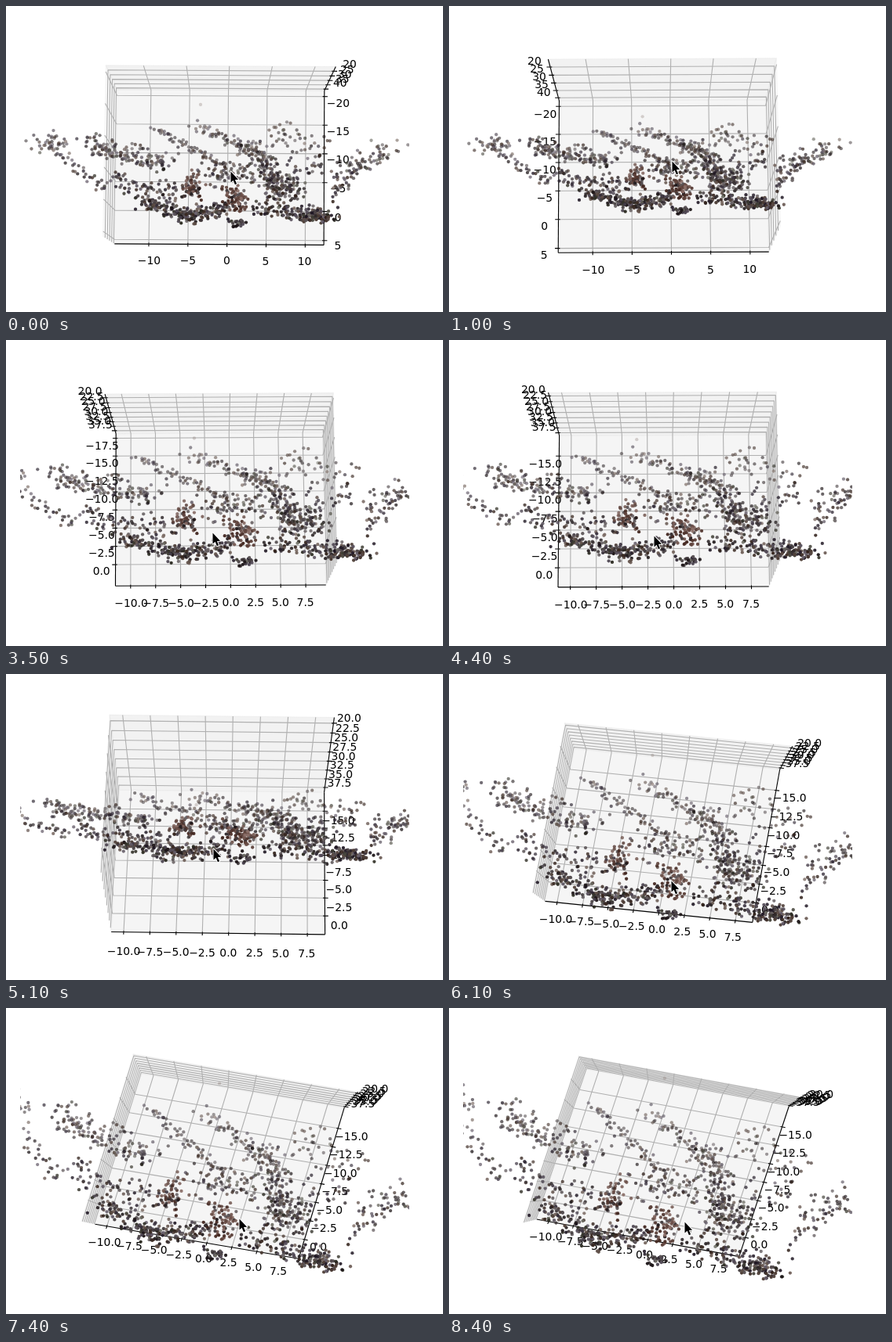
Write an HTML page with a canvas that moves like this. It is 557 px wide and 391 px high and loops after 8500 ms.

```html
<!DOCTYPE html>
<html lang="en">
<head>
<meta charset="utf-8">
<title>Rotating point cloud</title>
<style>
  html, body { margin: 0; width: 100%; height: 100%; overflow: hidden; background: #fff; }
  canvas { display: block; width: 557px; height: 391px; }
</style>
</head>
<body>
<canvas id="stage" width="557" height="391"></canvas>
<script>
const ctx = document.getElementById('stage').getContext('2d');
const LOOP = 8500, STEP = 100, PAUSE = 100;
const CX = 272.7, CY = 196, SX = 2681, SY = 1998, DIST = 10;
const HALF = 0.5 + 1 / 48, LABEL = HALF + 0.0738;
const SPAN = 25.7, CENTER = [-1, -7.62, 28.75];
const RAD = Math.PI / 180;

// Ends of the drags: ms, tilt, turn in degrees. Each drag starts after a short pause.
const DRAGS = [[0, 5.6, -0.43], [1100, 12.2, 0.35], [1400, 11.3, 0.4], [4100, 11.3, 0.4],
  [5400, 27.9, -1.25], [6200, 4.4, -8.2], [6900, 4.1, -11.2], [7600, 3, -13.35], [8100, 1, -13.9]];

function ease(t, from, to) {
  const u = Math.max(0, Math.min(1, (t - from) / (to - from)));
  return u * u * (3 - 2 * u);
}

function viewAt(t) {
  const i = DRAGS.findIndex(d => d[0] > t);
  if (i < 0) return DRAGS[DRAGS.length - 1].slice(1);
  const a = DRAGS[i - 1], b = DRAGS[i];
  const u = ease(t, a[0] + PAUSE, b[0]);
  return [1, 2].map(k => a[k] + (b[k] - a[k]) * u);
}

let seed = 20731;
function rand() {
  seed = (seed + 0x6D2B79F5) | 0;
  let h = Math.imul(seed ^ (seed >>> 15), seed | 1);
  h ^= h + Math.imul(h ^ (h >>> 7), h | 61);
  return ((h ^ (h >>> 14)) >>> 0) / 4294967296;
}
const bell = r => (rand() + rand() + rand() - 1.5) * 1.3 * r;

function camera(tilt, turn) {
  const ct = Math.cos(tilt * RAD), st = Math.sin(tilt * RAD);
  const cs = Math.cos(turn * RAD), ss = Math.sin(turn * RAD);
  return {
    project([x, y, z]) {
      const q = x * ss - y * cs, r = x * cs + y * ss;
      const w = DIST + q * st + z * ct;
      return [CX + SX * r / w, CY - SY * (q * ct - z * st) / w];
    },
    // place on the stage plus depth back to cube space
    lift(px, py, z) {
      const k = (CY - py) / SY;
      const q = (DIST * k + z * (k * ct + st)) / (ct - k * st);
      const r = (px - CX) / SX * (DIST + q * st + z * ct);
      return [r * cs + q * ss, r * ss - q * cs, z];
    }
  };
}

function tone(warm) {
  const l = 20 + 85 * Math.pow(rand(), 1.2), h = rand();
  let c = [l + 7, l, l + 2];
  if (h < (warm ? 0.7 : 0.25)) c = [l + (warm ? 38 : 26), l + 10, l + 3];
  else if (h < 0.5) c = [l + 6, l - 2, l + 10];
  else if (h < 0.6) c = [l + 14, l + 13, l + 4];
  return c.map(Math.round).join();
}

function makeCloud() {
  const cam = camera(5.6, -0.43), cloud = [];
  const add = (x, y, z, warm) => {
    const alpha = 0.95 - 0.65 * Math.max(0, Math.min(1, (z + 0.62) / 1.27));
    cloud.push({ p: cam.lift(x, y, z), color: `rgba(${tone(warm)},${alpha.toFixed(2)})` });
  };
  // the scene leans away: higher on the stage is deeper
  const depth = y => 0.14 - 0.006 * (y - 150) + bell(0.06);

  const clump = (n, x, y, rx, ry, warm) => {
    for (let i = 0; i < n; i++) {
      const py = y + bell(ry);
      add(x + bell(rx), py, depth(py) - (warm ? 0.1 : 0), warm);
    }
  };
  const strand = (n, r, ...pts) => {
    for (let i = 0; i < n; i++) {
      const f = (i + rand()) / n * (pts.length - 1), k = Math.floor(f);
      const [a, b] = [pts[k], pts[k + 1]], u = f - k;
      const y = a[1] + (b[1] - a[1]) * u + bell(r);
      add(a[0] + (b[0] - a[0]) * u + bell(r), y, depth(y), false);
    }
  };

  clump(45, 57, 178, 22, 11);
  strand(28, 5, [70, 192], [130, 237]);
  strand(150, 10, [107, 173], [150, 190], [210, 202]);
  strand(85, 10, [130, 215], [185, 240], [228, 236]);
  strand(175, 7, [172, 251], [232, 268], [280, 258]);
  strand(65, 7, [318, 258], [375, 265]);
  strand(60, 4, [187, 156], [285, 207]);
  strand(62, 5, [241, 152], [325, 188]);
  strand(135, 10, [303, 180], [338, 205], [342, 240]);
  strand(66, 11, [252, 217], [318, 212]);
  strand(95, 14, [420, 235], [445, 203], [494, 181]);
  clump(55, 240, 228, 9, 13, true);
  clump(75, 292, 246, 12, 14, true);
  clump(24, 295, 277, 11, 4);
  clump(30, 233, 269, 14, 8);
  clump(100, 354, 234, 20, 17);
  clump(110, 394, 268, 20, 8);
  clump(25, 350, 168, 22, 15);
  clump(45, 384, 190, 27, 22);
  add(248, 126, 0.65, false);
  return cloud.sort((a, b) => b.p[2] - a.p[2]);
}
const cloud = makeCloud();

function path(pts) {
  ctx.beginPath();
  pts.forEach((p, i) => i ? ctx.lineTo(p[0], p[1]) : ctx.moveTo(p[0], p[1]));
}
function line(cam, color, ...pts) {
  path(pts.map(cam.project));
  ctx.strokeStyle = color;
  ctx.stroke();
}
const put = (p, axis, v) => p.map((c, i) => i === axis ? v : c);
const flip = (p, axis) => put(p, axis, -p[axis]);

function drawPanes(cam, back) {
  [242, 230, 236].forEach((g, axis) => {
    const b = (axis + 1) % 3, c = (axis + 2) % 3;
    path([back, flip(back, b), flip(flip(back, b), c), flip(back, c)].map(cam.project));
    ctx.closePath();
    ctx.fillStyle = ctx.strokeStyle = `rgba(${g},${g},${g},0.5)`;
    ctx.fill();
    ctx.stroke();
  });
}

function drawAxis(cam, back, axis, span) {
  const edge = flip(back, axis === 0 ? 1 : 0);
  line(cam, '#000', edge, flip(edge, axis));

  const step = span > 22.5 ? 5 : 2.5;
  const low = CENTER[axis] - span / 2, high = CENTER[axis] + span / 2;
  const ticks = [];
  for (let v = Math.ceil(low / step) * step; v <= high; v += step) ticks.push(v);
  const at = v => (v - CENTER[axis]) / span;

  for (const v of ticks) {
    const g = put(back, axis, at(v));
    line(cam, '#b0b0b0', flip(g, (axis + 1) % 3), g, flip(g, (axis + 2) % 3));
  }

  const dir = axis === 0 ? 1 : 0, sign = Math.sign(edge[dir]);
  for (const v of ticks) {
    const p = put(edge, axis, at(v));
    line(cam, '#000', put(p, dir, p[dir] + sign / 60), put(p, dir, p[dir] - sign / 120));
    const spot = p.map((c, i) => i === axis ? c : Math.sign(c) * LABEL);
    const [x, y] = cam.project(spot);
    const text = Math.abs(v).toFixed(step === 5 ? 0 : 1);
    ctx.fillStyle = '#000';
    ctx.fillText((v < 0 ? '\u2212' : '') + text, x, y + 11);
  }
}

function drawCloud(cam, scale) {
  ctx.save();
  ctx.beginPath();
  ctx.rect(18, 16, 496, 370);
  ctx.clip();
  for (const { p, color } of cloud) {
    const [x, y] = cam.project(p.map(c => c * scale));
    ctx.fillStyle = color;
    ctx.beginPath();
    ctx.arc(x, y, 2.15, 0, 7);
    ctx.fill();
  }
  ctx.restore();
}

function drawPointer(x, y) {
  ctx.save();
  ctx.translate(Math.round(x) + 0.5, Math.round(y) + 0.5);
  path([[0, 0], [0, 14], [3.1, 11.2], [5.4, 16.8], [7.6, 15.8], [5.4, 10.4], [9.6, 10.2]]);
  ctx.closePath();
  ctx.lineWidth = 2;
  ctx.strokeStyle = '#fff';
  ctx.stroke();
  ctx.fillStyle = '#000';
  ctx.fill();
  ctx.restore();
}

function draw(now) {
  const t = Math.floor(now % LOOP / STEP) * STEP;
  const [tilt, turn] = viewAt(t), zoom = ease(t, 2400, 3800);
  const span = SPAN * Math.exp(-0.2735 * zoom);
  const cam = camera(tilt, turn);
  const back = [turn > 0 ? HALF : -HALF, -HALF, HALF];

  ctx.fillStyle = '#fff';
  ctx.fillRect(0, 0, 557, 391);
  ctx.lineWidth = 1.11;
  ctx.lineJoin = 'round';
  ctx.font = '13.89px "DejaVu Sans", sans-serif';
  ctx.textAlign = 'center';
  drawPanes(cam, back);
  for (let axis = 0; axis < 3; axis++) drawAxis(cam, back, axis, span);
  drawCloud(cam, SPAN / span);

  // dragging ties the pointer to the view angles and the zoom
  const drift = 3.7 * ease(t, 1600, 1800);
  drawPointer(285 - 23.5 * zoom - turn * 496 / 180,
    222.5 + drift + 49.3 * zoom - tilt * 370 / 180);
}

const start = performance.now();
function frame() {
  draw(performance.now() - start);
  requestAnimationFrame(frame);
}
frame();
</script>
</body>
</html>
```
